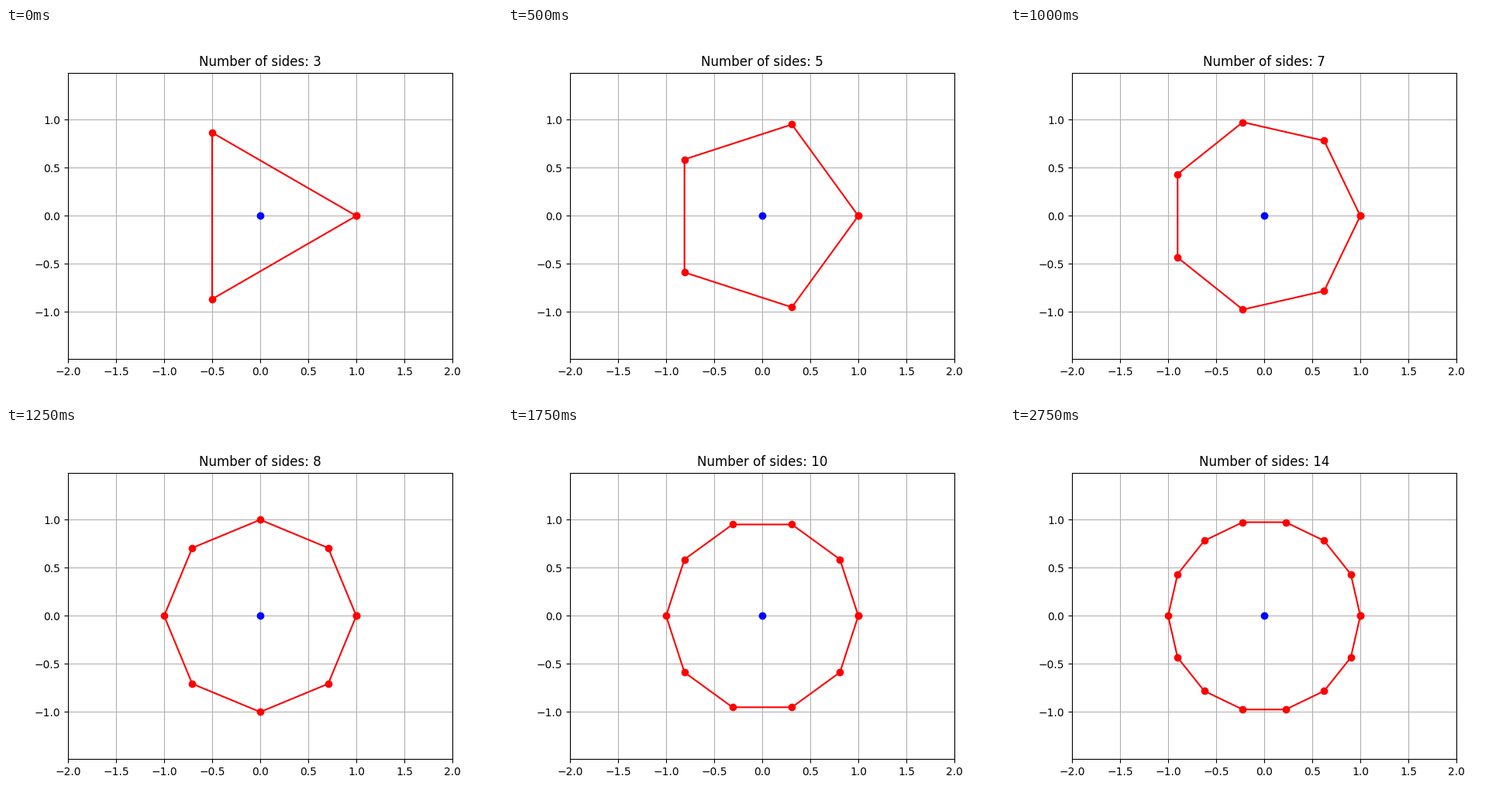
A matplotlib script that plays this animation: 640 by 480 pixels, repeating every 3000 ms.

```python
import numpy as np
import matplotlib.pyplot as plt
from matplotlib.animation import FuncAnimation

MIN_SIDES, MAX_SIDES = 3, 14
STEP_MS = 250


def polygon(sides):
    """Closed regular polygon on the unit circle."""
    angles = np.linspace(0, 2 * np.pi, sides + 1)
    return np.cos(angles), np.sin(angles)


fig, ax = plt.subplots(figsize=(6.4, 4.8), dpi=100)
half_height = 2 * 369.6 / 496  # equal scale on both axes
ax.set_xlim(-2, 2)
ax.set_ylim(-half_height, half_height)
ax.set_xticks(np.arange(-2, 2.1, 0.5))
ax.set_yticks(np.arange(-1, 1.1, 0.5))
ax.grid(True)

outline, = ax.plot([], [], "ro-")
ax.plot(0, 0, "bo")
title = ax.set_title("")


def update(frame):
    sides = MIN_SIDES + frame
    outline.set_data(*polygon(sides))
    title.set_text(f"Number of sides: {sides}")
    return outline, title


anim = FuncAnimation(fig, update, frames=MAX_SIDES - MIN_SIDES + 1,
                     init_func=lambda: update(0), interval=STEP_MS,
                     repeat=True, repeat_delay=0, blit=False)

plt.show()
```
